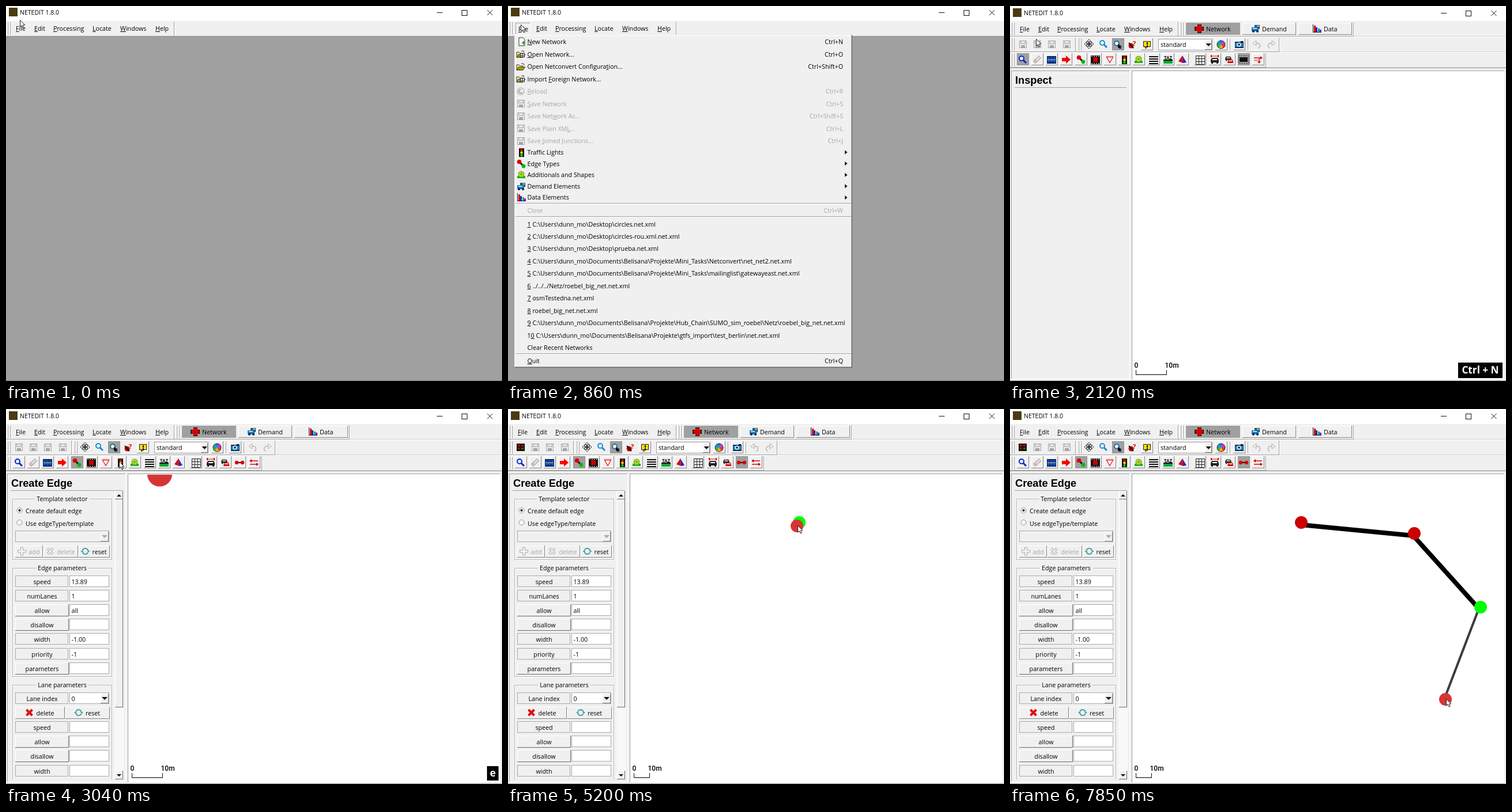
These frames come from a looping animation (860 px wide and 651 px high, 8000 ms). An HTML page with a canvas:

```html
<!DOCTYPE html>
<html lang="en">
<head>
<meta charset="utf-8">
<title>Network editor</title>
<style>
html, body { margin: 0; width: 100%; height: 100%; overflow: hidden; background: #f0f0f0; }
canvas { display: block; }
</style>
</head>
<body>
<canvas id="c" width="860" height="651"></canvas>
<script>
const g = document.getElementById('c').getContext('2d');
const UI = '10.7px "Open Sans", "Noto Sans", sans-serif';
const FACE = '#f0f0f0', MID = '#a0a0a0', DARK = '#696969', OFF = '#a6a6a6';
const LOOP = 8000;
const times = [0, 410, 860, 1280, 1700, 2120, 2570, 3040, 3470, 3900, 4320, 4770,
  5200, 5650, 6080, 6510, 6980, 7390, 7850];
// pointer outside the drawing area, then the edge tip while drawing
const pointer = [[24, 24], [22, 32], [22, 32], [24, 60], [24, 60], [45, 57], [266, 118],
  [196, 91], [360, 99], [427, 74]];
const tips = [[425, 171], [503, 195], [501, 203], [721, 219], [723, 221], [703, 219],
  [816, 344], [809, 352], [755, 504]];
const nodes = [[505, 197, 12], [701, 216, 15], [816, 344, 17]];

function box(x, y, w, h, c) { g.fillStyle = c; g.fillRect(x, y, w, h); }
function frame(x, y, w, h, c) { g.strokeStyle = c; g.lineWidth = 1; g.strokeRect(x + .5, y + .5, w - 1, h - 1); }
function disc(x, y, r, c) { g.fillStyle = c; g.beginPath(); g.arc(x, y, r, 0, 7); g.fill(); }
function poly(p, c, line) {
  g.beginPath();
  for (let i = 0; i < p.length; i += 2) g.lineTo(p[i], p[i + 1]);
  g.closePath();
  if (c) { g.fillStyle = c; g.fill(); }
  if (line) { g.strokeStyle = line; g.lineWidth = 1; g.stroke(); }
}
function seg(x1, y1, x2, y2, c, w = 1) {
  g.strokeStyle = c; g.lineWidth = w;
  g.beginPath(); g.moveTo(x1, y1); g.lineTo(x2, y2); g.stroke();
}
function ring(x, y, r, c, w, a = 0, b = 7) {
  g.strokeStyle = c; g.lineWidth = w; g.beginPath(); g.arc(x, y, r, a, b); g.stroke();
}
// y is the middle of the capitals; & marks the underlined letter
function text(s, x, y, c = '#000', align = 'left', font = UI) {
  const k = s.indexOf('&');
  s = s.replace('&', '');
  g.font = font; g.fillStyle = c; g.textAlign = 'left';
  const w = g.measureText(s).width;
  if (align === 'right') x -= w;
  if (align === 'center') x -= w / 2;
  g.fillText(s, x, y + 4);
  if (k >= 0) {
    const a = g.measureText(s.slice(0, k)).width;
    box(x + a, Math.round(y) + 5, g.measureText(s[k]).width, 1, c);
  }
}
function bevel(x, y, w, h, fill = FACE, up = true) {
  box(x, y, w, h, fill);
  const a = up ? '#fff' : MID, b = up ? '#868686' : '#fff';
  box(x, y, w, 1, a); box(x, y, 1, h, a);
  box(x, y + h - 1, w, 1, b); box(x + w - 1, y, 1, h, b);
}
function grip(x, y) {
  for (const d of [0, 4]) { box(x + d, y, 1, 22, '#fff'); box(x + d + 1, y, 1, 22, MID); }
}
function vline(x, y, h) { box(x, y, 1, h, MID); box(x + 1, y, 1, h, '#fff'); }

// icons are drawn around (0, 0)
const icons = {
  save(c = '#a4a4a4') {
    frame(-6, -6, 13, 13, c); box(-4, -5, 9, 5, '#e4e4e4'); frame(-4, -6, 9, 6, c); box(-3, 2, 7, 4, c);
  },
  grid() {
    box(-7, -6, 14, 13, '#111'); box(-5, -4, 4, 3, '#d00'); box(1, -4, 4, 3, '#d00');
    box(-5, 1, 4, 3, '#b00'); box(1, 1, 4, 3, '#080');
  },
  page() {
    poly([-5, -7, 2, -7, 5, -4, 5, 7, -5, 7], '#fff', '#333');
    box(0, 1, 5, 2, '#2a2'); box(2, -1, 2, 6, '#2a2');
  },
  folder(net) {
    poly([-7, -3, -3, -3, -1, -1, 4, -1, 4, 6, -7, 6], '#ffec80', '#333');
    poly([-4, 1, 8, 1, 4, 6, -7, 6], '#a8a000', '#333');
    seg(1, -5, 5, -5, '#333'); seg(5, -5, 6, -2, '#333');
    if (net) { box(-1, -1, 8, 7, '#fff'); frame(-1, -1, 8, 7, '#222'); seg(3, -1, 3, 6, '#222'); seg(-1, 3, 7, 3, '#222'); }
  },
  reload(c = '#aaa') { ring(0, 0, 6, c, 1.2); ring(0, 0, 3, c, 2, .5, 5); },
  light() {
    box(-4, -7, 9, 15, '#111');
    ['#f00', '#fe0', '#0d0'].forEach((c, i) => disc(.5, -4 + i * 4.5, 2.2, c));
  },
  types() { seg(-3, -3, 4, 4, '#111', 3); disc(-3.5, -3.5, 3.8, '#d00'); disc(4, 4, 3.4, '#0b0'); },
  stop() { box(-7, 2, 14, 4, '#2a2'); disc(0, -1, 5.5, '#6b2'); ring(0, -1, 3, '#dd2', 1.5); },
  car() {
    box(-2, -6, 9, 7, '#157'); box(-7, -2, 12, 7, '#17c'); box(-5, -1, 7, 2, '#9df');
    box(2, -5, 4, 2, '#fb3'); disc(-4, 5, 2, '#222'); disc(3, 5, 2, '#222');
  },
  bars() {
    seg(-6.5, -7, -6.5, 7, '#111'); box(-5, -5, 3, 11, '#d00'); box(-2, -2, 3, 8, '#22c');
    box(2, 0, 3, 6, '#0a8'); box(5, 2, 3, 4, '#82c'); box(-7, 6, 15, 1, '#111');
  },
  network() { box(-3, -7, 7, 15, '#111'); box(-8, -3, 16, 7, '#111'); poly([-1, -6, 2, -6, 7, 0, 7, 1, 2, 7, -1, 7, -7, 1, -7, 0], '#d00'); },
  move() {
    seg(-6, 0, 6, 0, '#222', 2); seg(0, -6, 0, 6, '#222', 2);
    for (let k = 0; k < 4; k++) { g.rotate(Math.PI / 2); poly([0, -8, 4, -4, -4, -4], '#fff', '#222'); }
  },
  lens(c = '#28c') { seg(1, 1, 6, 6, c, 3); disc(-2, -2, 4.5, '#dff'); ring(-2, -2, 4, c, 2); },
  pick() { icons.lens('#369'); poly([0, -1, 7, 3, 4, 4, 6, 7, 3, 7, 0, 5], '#111'); },
  locate() { disc(-2, 2, 4.5, '#c00'); seg(-6, -3, 2, 6, '#111', 2); text('?', 1, -2, '#d00', 'left', 'bold 11px "Open Sans", sans-serif'); },
  tip() { box(-6, -6, 13, 10, '#fd0'); frame(-6, -6, 13, 10, '#222'); poly([-3, 4, 2, 4, -2, 7], '#fd0', '#222'); box(0, -4, 2, 4, '#111'); box(0, 1, 2, 2, '#111'); },
  wheel() {
    ['#e33', '#fa0', '#3b3', '#0aa', '#36e', '#c3c'].forEach((c, k) => {
      g.fillStyle = c; g.beginPath(); g.moveTo(0, 0); g.arc(0, 0, 7, k * Math.PI / 3, (k + 1) * Math.PI / 3); g.fill();
    });
    ring(0, 0, 7, '#222', 1);
  },
  camera() { box(-7, -5, 15, 11, '#036'); box(-6, -3, 13, 7, '#28b'); disc(0, 0, 3.5, '#fff'); disc(0, 0, 2, '#036'); box(3, -6, 4, 2, '#111'); },
  undo(c = '#b4b4b4') { ring(1, 3, 4.5, c, 1.5, -2.2, 1.2); poly([-7, -1, -1, -6, -1, 3], '#eee', c); },
  redo(c) { g.scale(-1, 1); icons.undo(c); },
  eraser() { g.rotate(-.75); box(-7, -3, 14, 6, '#ddd'); box(-7, -3, 5, 6, '#ecb6b0'); frame(-7, -3, 14, 6, '#aaa'); },
  select() { box(-8, -6, 16, 13, '#024'); for (let k = 0; k < 6; k++) box(-7 + k % 3 * 5, k < 3 ? -4 : 2, 4, 3, '#15e'); seg(-7, .5, 7, .5, '#fff'); },
  arrow() { poly([-7, -3, 0, -3, 0, -7, 8, 0, 0, 7, 0, 3, -7, 3], '#f00'); },
  cross() { box(-8, -7, 16, 15, '#111'); box(-4, -4, 8, 8, '#c00'); for (const k of [-7, -3, 1, 5]) { box(k, -6, 2, 1, '#fff'); box(k, 6, 2, 1, '#fff'); } },
  yieldSign() { poly([-6, -5, 6, -5, 0, 6], '#fff', '#e00'); poly([-5, -4, 5, -4, 0, 5], null, '#e33'); },
  lines() { for (let k = -6; k < 7; k += 4) box(-8, k, 16, 2, '#111'); },
  taz() { text('TAZ', 0, -4, '#111', 'center', 'bold 8px "Open Sans", sans-serif'); box(-8, 0, 16, 2, '#111'); box(-8, 2, 16, 5, '#0a3'); },
  shape() { poly([0, -7, 7, 5, 1, 6], '#22c'); poly([0, -7, 1, 6, -7, 3], '#d00'); },
  table() { box(-7, -7, 15, 15, '#fff'); for (let k = -7; k < 9; k += 5) { seg(k + .5, -7, k + .5, 8, '#222'); seg(-7, k + .5, 8, k + .5, '#222'); } },
  auto(red) {
    poly([-5, -3, 5, -3, 7, 1, 7, 5, -7, 5, -7, 1], '#222'); box(-4, -1, 8, 2, '#fff');
    box(-6, 5, 3, 2, '#111'); box(3, 5, 3, 2, '#111');
    if (red) { seg(-7, -6, 7, -6, '#e00'); box(-7, -8, 2, 4, '#e00'); box(5, -8, 2, 4, '#e00'); }
  },
  autos() { g.scale(.75, .75); g.translate(-2, -4); icons.auto(); g.translate(5, 7); poly([-5, -3, 5, -3, 7, 5, -7, 5], '#d00'); box(-4, -1, 8, 2, '#fff'); },
  rect() { box(-7, -4, 14, 8, '#111'); g.setLineDash([2, 2]); frame(-9, -7, 18, 14, '#222'); g.setLineDash([]); },
  bell() { seg(-5, 0, 5, 0, '#111', 2); disc(-5, 0, 3.2, '#d00'); disc(5, 0, 3.2, '#d00'); },
  split() { seg(-7, -3, 5, -3, '#d00', 1.5); seg(2, -3, 2, 5, '#d00', 1.5); poly([4, -6, 8, -3, 4, 0], '#d00'); poly([-1, 3, 5, 3, 2, 7], '#d00'); seg(-7, 1, 0, 1, '#d00'); },
  both() {
    seg(-6, -3, 7, -3, '#d00', 1.5); poly([-4, -6, -8, -3, -4, 0], '#d00');
    seg(-7, 3, 6, 3, '#d00', 1.5); poly([4, 0, 8, 3, 4, 6], '#d00');
  },
  plus() { poly([-2, -7, 2, -7, 2, -2, 7, -2, 7, 2, 2, 2, 2, 7, -2, 7, -2, 2, -7, 2, -7, -2, -2, -2], '#f4f4f4', '#aaa'); },
  del(c = '#d11') { seg(-5, -5, 5, 5, c, 4); seg(5, -5, -5, 5, c, 4); },
  delOff() { icons.del('#aaa'); seg(-5, -5, 5, 5, '#f4f4f4', 2); seg(5, -5, -5, 5, '#f4f4f4', 2); },
  reset() { ring(0, 0, 5, '#3a9a9a', 2, .4, 2.9); ring(0, 0, 5, '#3a9a9a', 2, 3.5, 6); poly([3, -1, 8, -1, 5.5, 2], '#3a9a9a'); poly([-8, 1, -3, 1, -5.5, -2], '#3a9a9a'); }
};
function icon(name, x, y, arg) { g.save(); g.translate(x, y); icons[name](arg); g.restore(); }

function titleBar(d) {
  box(0, 0, 860, 26, '#fff');
  box(5, 3 + d, 15, 15, '#4a3b12');
  text('NETEDIT 1.8.0', 24, 11 + d, '#000', 'left', '10.5px "Open Sans", sans-serif');
  box(747, 11 + d, 10, 1, '#111');
  frame(790, 7 + d, 10, 10, '#111');
  seg(834.5, 7 + d, 843.5, 16 + d, '#111'); seg(843.5, 7 + d, 834.5, 16 + d, '#111');
}
function menuBar(d, fileState) {
  box(0, 26, 860, 26 + d, FACE);
  grip(2, 28 + d);
  if (fileState) bevel(13, 29, 26, 21, FACE, fileState === 1);
  const s = fileState === 2 ? 1 : 0;
  text('&File', 17 + s, 39 + d + s);
  [['&Edit', 49], ['&Processing', 82], ['&Locate', 150], ['&Windows', 198], ['&Help', 259]]
    .forEach(([t, x]) => text(t, x, 39 + d));
  vline(291, 27 + d, 25);
}

const commands = [
  ['&New Network', 'Ctrl+N', 'page'], ['&Open Network...', 'Ctrl+O', 'folder', 1],
  ['Open Netconvert Configura&tion...', 'Ctrl+Shift+O', 'folder'],
  ['Import &Foreign Network...', '', 'folder', 1], ['&Reload', 'Ctrl+R', 'reload'],
  ['&Save Network', 'Ctrl+S', 'save'], ['Save Net&work As...', 'Ctrl+Shift+S', 'save'],
  ['Save Plain XM&L...', 'Ctrl+L', 'save'], ['Save &Joined Junctions...', 'Ctrl+J', 'save']];
const groups = [['Traffic Lights', 'light'], ['Edge Types', 'types'], ['Additionals and Shapes', 'stop'],
  ['Demand Elements', 'car'], ['Data Elements', 'bars']];
const home = 'C:\\Users\\dunn_mo\\', work = home + 'Documents\\Belisana\\Projekte\\';
const recent = [home + 'Desktop\\circles.net.xml', home + 'Desktop\\circles-rou.xml.net.xml',
  home + 'Desktop\\prueba.net.xml', work + 'Mini_Tasks\\Netconvert\\net_net2.net.xml',
  work + 'Mini_Tasks\\mailinglist\\gatewayeast.net.xml', '../../../Netz/roebel_big_net.net.xml',
  'osmTestedna.net.xml', 'roebel_big_net.net.xml',
  work + 'Hub_Chain\\SUMO_sim_roebel\\Netz\\roebel_big_net.net.xml',
  work + 'gtfs_import\\test_berlin\\net.net.xml'];

function fileMenu(hot) {
  box(11, 50, 586, 578, FACE);
  box(11, 50, 1, 578, '#e3e3e3'); box(12, 51, 584, 1, '#fff'); box(12, 51, 1, 576, '#fff');
  box(596, 50, 1, 579, DARK); box(11, 627, 586, 1, DARK); box(595, 51, 1, 576, MID); box(12, 626, 584, 1, MID);
  if (hot) box(13, 51, 582, 22, '#0078d7');
  commands.forEach(([t, key, ic, arg], i) => {
    const y = 62 + i * 21.5, c = hot && !i ? '#fff' : i > 3 ? OFF : '#000';
    icon(ic, i ? 22 : 24, Math.floor(y), arg);
    text(t, 33.5, y, c); text(key, 581, y, c, 'right');
  });
  groups.forEach(([t, ic], i) => {
    const y = 254 + i * 19.6;
    icon(ic, 23, Math.round(y)); text(t, 33.5, y);
    poly([584, y - 3.5, 588.5, y, 584, y + 3.5], '#111');
  });
  for (const y of [342, 365, 603]) { box(13, y, 582, 1, MID); box(13, y + 1, 582, 1, '#fff'); }
  text('Close', 33.5, 355, OFF); text('Ctrl+W', 581, 355, OFF, 'right');
  recent.forEach((p, i) => text((i < 9 ? '&' + (i + 1) : '1&0') + ' ' + p, 33.5, 378.5 + i * 21.45));
  text('Clear Recent Networks', 33.5, 593);
  text('&Quit', 33.5, 616); text('Ctrl+Q', 581, 616, '#000', 'right');
}

function tool(name, x, y, arg, down) {
  if (down) { box(x - 10, y - 11, 21, 21, MID); frame(x - 10, y - 11, 21, 21, '#909090'); }
  else bevel(x - 10, y - 11, 21, 21);
  icon(name, x, y, arg);
}
function toolbars(i) {
  const edge = i > 6, saved = i > 8;
  // each bar ends in a shadow line below its own width
  [[53, 596], [80, 467], [107, 444]].forEach(([y, w]) => {
    box(0, y - 1, 860, 1, '#d0d0d0'); box(0, y - 1, w, 1, MID); box(0, y, 860, 1, '#fff');
  });
  box(0, 107, 860, 1, MID);
  grip(295, 29);
  box(305, 29, 94, 21, MID); bevel(403, 29, 93, 21); bevel(500, 29, 93, 21);
  icon('network', 328, 39); text('Network', 340, 40);
  icon('car', 426, 39); text('Demand', 437, 40);
  icon('bars', 532, 39); text('Data', 544, 40);
  vline(595, 28, 24);
  grip(2, 56); grip(2, 83); vline(113, 55, 24); grip(118, 56);
  icon(saved ? 'grid' : 'save', 22, 66);
  for (const x of [47, 72, 98]) icon('save', x, 66);
  icon('move', 137, 66); icon('lens', 162, 66);
  tool('pick', 187, 67, undefined, true);
  icon('locate', 212, 67); tool('tip', 237, 67);
  box(257, 57, 94, 20, '#fff'); frame(257, 57, 94, 20, MID); bevel(338, 59, 12, 17);
  poly([339.5, 65, 349, 65, 344.2, 70], '#111'); text('standard', 261, 67);
  tool('wheel', 366, 67); vline(381, 57, 20); tool('camera', 397, 67); vline(412, 57, 20);
  icon('undo', 428, 66); icon('redo', 453, 66, saved && i < 12 ? '#444' : undefined); vline(466, 55, 24);

  const y = 93;
  tool('lens', 22, y, '#12c', !edge);
  ['eraser', 'select', 'arrow', 'types', 'cross', 'yieldSign', 'light', 'stop', 'lines', 'taz', 'shape']
    .forEach((n, k) => tool(n, Math.round(47 + k * 25.2), y, undefined, edge && n === 'types'));
  tool('table', 329, y); tool('auto', 355, y, 1); tool('autos', 380, y);
  tool(edge ? 'bell' : 'rect', 405, y, undefined, !edge || saved);
  tool(edge ? 'both' : 'split', 430, y);
  vline(443, 82, 24);
}

function group(y, h, title) {
  frame(12, y + 1, 173, h, '#fff'); frame(11, y, 173, h, '#b4b4b4');
  g.font = UI;
  const w = g.measureText(title).width + 6;
  box(97.5 - w / 2, y - 2, w, 5, FACE);
  text(title, 97.5, y, '#000', 'center');
}
function row(y, name, value = '') {
  y = Math.floor(y);
  if (/allow|parameters/.test(name)) { bevel(16, y - 10, 93, 21); box(16, y + 10, 93, 1, DARK); box(108, y - 10, 1, 21, DARK); }
  else frame(16, y - 10, 92, 20, '#aaa');
  text(name, 62.5, y + .5, '#000', 'center');
  box(110, y - 10, 69, 20, '#fff'); frame(110, y - 10, 69, 20, '#aaa');
  text(value, 113.5, y + .5);
}
function button(x, y, w, name, ic, c) {
  bevel(x, y, w, 21);
  g.font = UI;
  const left = x + (w - g.measureText(name).width - 18) / 2;
  icon(ic, left + 6, y + 10); text(name, left + 18, y + 10.5, c);
}
function drop(x, y, c) { bevel(x, y, 14, 17); poly([x + 2, y + 6, x + 12, y + 6, x + 7, y + 11], c); }

function panel(edge) {
  box(2, 112, 206, 1, MID); box(2, 112, 1, 535, MID); box(207, 112, 1, 535, '#fff'); box(2, 647, 206, 1, '#fff');
  text(edge ? 'Create Edge' : 'Inspect', 9, 131, '#000', 'left', 'bold 18.2px "Liberation Sans", Arial, sans-serif');
  box(8, 141, 194, 1, MID);
  if (!edge) return;
  g.save();
  g.beginPath(); g.rect(4, 142, 200, 501); g.clip();
  group(156, 106, 'Template selector');
  for (const y of [176, 197]) { disc(23.5, y, 5, '#fff'); ring(23.5, y, 4.5, '#888', 1); }
  disc(23.5, 176, 2, '#000');
  text('Create default edge', 34, 177); text('Use edgeType/template', 34, 198.5);
  frame(16, 211, 163, 20, '#aaa'); drop(164, 213, '#aaa');
  button(16, 237, 48, 'add', 'plus', OFF); button(65, 237, 60, 'delete', 'delOff', OFF); button(126, 237, 54, 'reset', 'reset');
  group(276, 189, 'Edge parameters');
  [['speed', '13.89'], ['numLanes', '1'], ['allow', 'all'], ['disallow'], ['width', '-1.00'], ['priority', '-1'], ['parameters']]
    .forEach(([n, v], k) => row(299 + k * 25.2, n, v));
  group(479, 180, 'Lane parameters');
  row(502, 'Lane index', '0'); drop(164, 494, '#111');
  button(16, 517, 86, 'delete', 'del'); button(103, 517, 77, 'reset', 'reset');
  ['speed', 'allow', 'disallow', 'width'].forEach((n, k) => row(552.5 + k * 25.2, n));
  box(188, 142, 16, 501, '#f8f8f8');
  for (const [y, h] of [[142, 15], [157, 361], [628, 15]]) {
    bevel(189, y, 14, h); box(189, y + h - 1, 14, 1, DARK); box(202, y, 1, h, DARK);
  }
  poly([192, 152, 200, 152, 196, 148], '#111'); poly([192, 634, 200, 634, 196, 638], '#111');
  g.restore();
}

function offsetLine(a, b, off, w, c) {
  const dx = b[0] - a[0], dy = b[1] - a[1], n = off / (Math.hypot(dx, dy) || 1);
  seg(a[0] - dy * n, a[1] + dx * n, b[0] - dy * n, b[1] + dx * n, c, w);
}
function view(i) {
  box(211, 112, 646, 536, '#fff');
  box(211, 112, 646, 1, MID); box(211, 112, 1, 536, MID);
  const near = i < 9, end = near ? 271 : 245, font = '500 12px Roboto, sans-serif';
  text('0', 215.5, 624, '#000', 'left', font);
  text('10m', end - 2.5, 624, '#000', 'left', font);
  box(218, 639.3, end - 217, 1.2, '#111'); box(218, 632, 1, 8, '#111'); box(end, 632, 1, 8, '#111');
  if (i < 7) return;
  g.save();
  g.beginPath(); g.rect(213, 114, 643, 532); g.clip();
  const tip = i < 9 ? [266.5, 113] : i < 10 ? [278, 113] : tips[i - 10];
  const made = nodes.filter(n => i >= n[2]), last = made.length - 1;
  for (let k = 0; k < last; k++) offsetLine(made[k], made[k + 1], 4, 8, '#000');
  if (last >= 0) offsetLine(made[last], tip, 2, 4, '#3c3c3c');
  made.forEach(([x, y], k) => disc(x, y, 11, k === last ? '#0f0' : '#c00'));
  disc(tip[0], tip[1], near ? 21.6 : 11, '#d73535');
  g.restore();
}

function keys(s, x, w) {
  box(x, 620, w, 25, '#000');
  if (w > 30) box(x, 619, w, 27, '#000');
  text(s, x + w / 2, 634, '#fff', 'center', 'bold 17.2px "Open Sans", "Noto Sans", sans-serif');
}
function arrow(x, y) {
  g.save(); g.translate(x + .5, y + .5);
  poly([0, 0, 0, 11.5, 2.7, 9, 4.7, 13.5, 6.7, 12.7, 4.8, 8.4, 8.4, 8.4], '#fff', '#222');
  g.restore();
}

function draw(t) {
  let i = times.length - 1;
  while (times[i] > t) i--;
  box(0, 0, 860, 651, FACE);
  if (i < 5) {
    titleBar(0);
    menuBar(0, Math.min(i, 2));
    box(0, 52, 860, 599, MID); box(0, 52, 860, 1, '#929292'); box(0, 650, 860, 1, '#808080');
    if (i > 1) fileMenu(i > 2);
  } else {
    titleBar(1);
    menuBar(1, 0);
    toolbars(i);
    panel(i > 6);
    view(i);
    box(0, 650, 860, 1, MID);
  }
  if (i === 4 || i === 5) keys('Ctrl + N', 777, 77);
  if (i > 5 && i < 9) keys('e', 834, 20);
  const p = i < 10 ? pointer[i] : [tips[i - 10][0] + 1, tips[i - 10][1] - 1];
  arrow(p[0], p[1]);
}
function tick() {
  draw(performance.now() % LOOP);
  requestAnimationFrame(tick);
}
tick();
</script>
</body>
</html>
```
